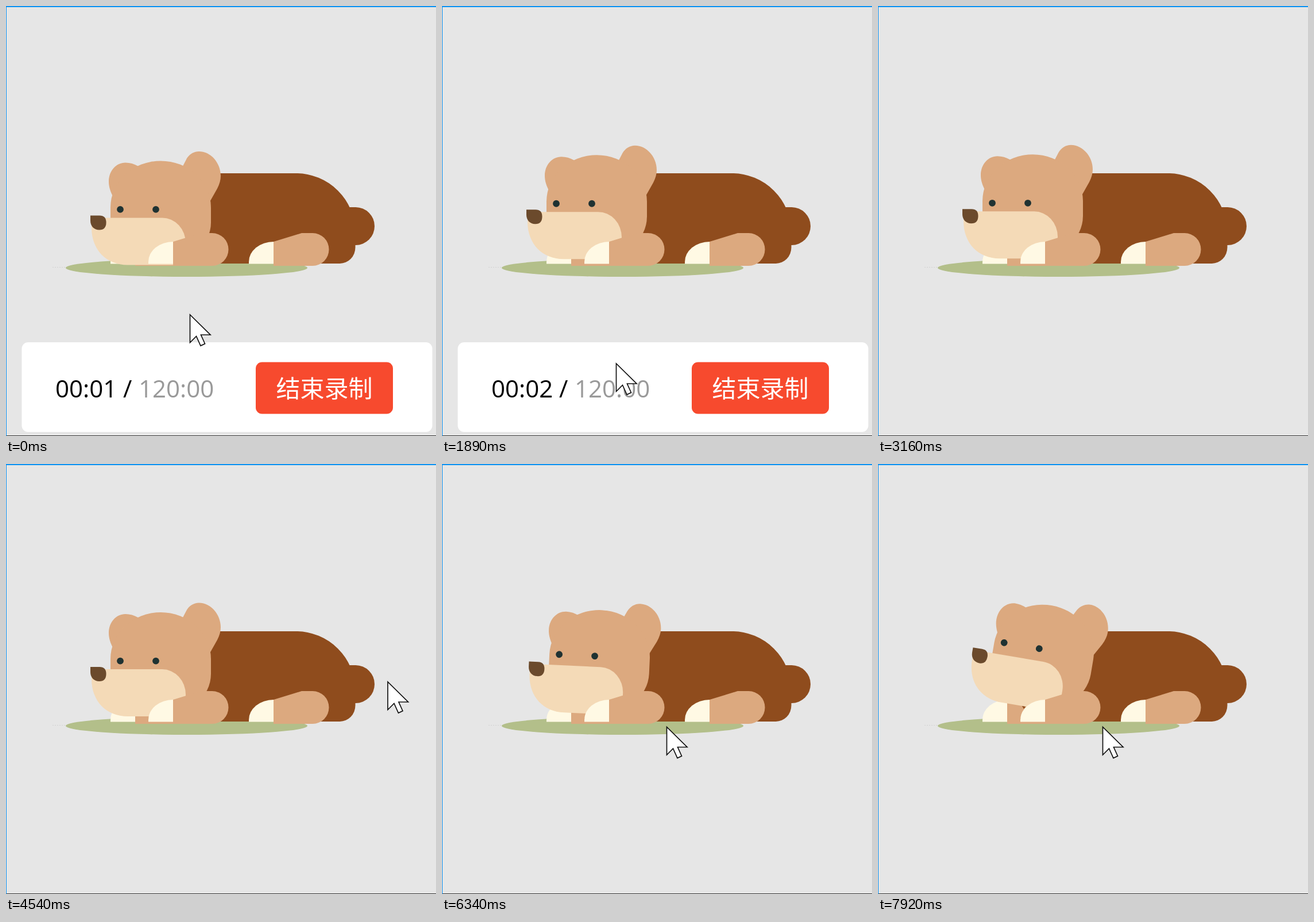
Animation of 749x748 px, one loop 8 s. Source, as an HTML page:

```html
<!DOCTYPE html>
<html lang="zh-CN">
<head>
<meta charset="utf-8">
<title>Resting bear</title>
<style>
  html, body { margin: 0; width: 100%; height: 100%; overflow: hidden; background: #e6e6e6; }
  svg { display: block; width: 100vw; height: 100vh; }
  text { font: 42px "Open Sans", "Noto Sans", sans-serif; }
  .label { font-family: "Noto Sans CJK SC", "Noto Sans CJK", sans-serif; }
  .tan { fill: #dca97f; }
  .brown { fill: #8f4c1d; }
  .cream { fill: #fff9e4; }
</style>
</head>
<body>
<svg viewBox="0 0 749 748">
  <defs>
    <g id="leg">
      <path class="tan" d="M291 410L340 395H359A28.5 28.5 0 0 1 359 452H291Z"/>
      <path class="cream" d="M248 448.5V445A43 35 0 0 1 291 410V448.5Z"/>
    </g>
  </defs>
  <rect width="749" height="748" fill="#e6e6e6"/>
  <path d="M81 454.5H104" stroke="#d2d2d2" stroke-dasharray="2 2"/>
  <ellipse cx="314.5" cy="455.5" rx="210.5" ry="15.5" fill="#b3bf8a"/>

  <path class="brown" d="M300 291H505A103.5 103 0 0 1 608.5 394V420A27 28 0 0 1 581.5 448H300Z"/>
  <path class="brown" d="M560 350H609A33 33 0 0 1 609 416H560Z"/>
  <use href="#leg" x="175"/>
  <use href="#leg" x="-66"/>
  <path class="brown" d="M249 418L259 420L254 426Z"/>

  <g id="head">
    <g id="ears" class="tan">
      <path d="M240 275L230 267C223 263 216 261 208 261C192 261 179 275 179 294C179 303 182 312 187 321L200 345Z"/>
      <path d="M296 290L308 267L313.500 256.500C318 247 327 241.500 336 241.500C357 241.500 374 262 374 284C374 291 372 298 368 306L342 352Z"/>
    </g>
    <path class="tan" d="M182 339A87.500 81 0 0 1 357 339V365A87.500 74 0 0 1 182 365Z"/>
    <path d="M149 357H272A41 44 0 0 1 313 401V439H212C175 439 149 413 149 374Z" fill="#f4dab7"/>
    <path d="M147 353H163Q174.500 353 174.500 365Q174.500 378 162.500 378C153 378 147 371 147 362Z" fill="#6b4a2c"/>
    <g id="eyes" fill="#1f3232">
      <circle cx="199" cy="342.500" r="5.900"/>
      <circle cx="261" cy="342.500" r="5.900"/>
    </g>
  </g>
  <use href="#leg"/>

  <g id="bar">
    <rect x="27.500" y="585" width="715" height="156" rx="11" fill="#fff"/>
    <text id="clock" x="86" y="681"></text>
    <text x="204" y="681">/</text>
    <text x="231" y="681" fill="#999">120:00</text>
    <rect x="435" y="619.500" width="239" height="90" rx="11" fill="#f74a2e"/>
    <text class="label" x="554.500" y="681" fill="#fff" text-anchor="middle">结束录制</text>
  </g>

  <path d="M0 747.500H749" stroke="#333"/>
  <path d="M0 0H749V2H1V748H0Z" fill="#0d92f2"/>
  <path id="cursor" d="M0 0V48.500L11 37.500L18.500 54L26 50.500L19 35H35.500Z" fill="#fff" stroke="#111" stroke-width="1.700"/>
</svg>
<script>
  const LOOP = 8000;
  const [head, ears, eyes, bar, clock, cursor] =
    ["head", "ears", "eyes", "bar", "clock", "cursor"].map(id => document.getElementById(id));

  // Pointer stops: time, x, y
  const stops = [
    [0, 320.5, 537], [400, 320.5, 537], [820, 316, 573], [1050, 303.5, 622],
    [1920, 303.5, 622], [2400, 770, 650], [3180, 770, 500], [3420, 685, 414],
    [3700, 665, 379], [5080, 665, 379], [5680, 454, 406], [5880, 454, 406],
    [6250, 391.5, 457.5], [LOOP, 391.5, 457.5]
  ];

  function pointerAt(t) {
    const i = stops.findIndex(s => s[0] > t);
    const [t0, x0, y0] = stops[i - 1], [t1, x1, y1] = stops[i];
    const p = (t - t0) / (t1 - t0), e = p * p * (3 - 2 * p);
    return [x0 + (x1 - x0) * e, y0 + (y1 - y0) * e];
  }

  // Critically damped approach from 0 to 1
  function settle(t, start, tau) {
    const u = Math.max(0, t - start) / tau;
    return 1 - (1 + u) * Math.exp(-u);
  }

  function render(t) {
    const drop = 11.4 * Math.exp(-t / 850);
    const turn = 10 * settle(t, 5955, 386);
    const look = settle(t, 5955, 190);
    head.setAttribute("transform", `translate(0 ${drop}) rotate(${turn} 357 446)`);
    eyes.setAttribute("transform", `translate(0 ${-6.8 * look})`);
    ears.setAttribute("transform", `translate(0 ${4 * look})`);
    cursor.setAttribute("transform", `translate(${pointerAt(t)})`);
    clock.textContent = t < 1770 ? "00:01" : "00:02";
    bar.style.display = t < 2500 ? "" : "none";
  }

  const begin = performance.now();
  function tick() {
    render((performance.now() - begin) % LOOP);
    requestAnimationFrame(tick);
  }
  tick();
</script>
</body>
</html>
```
